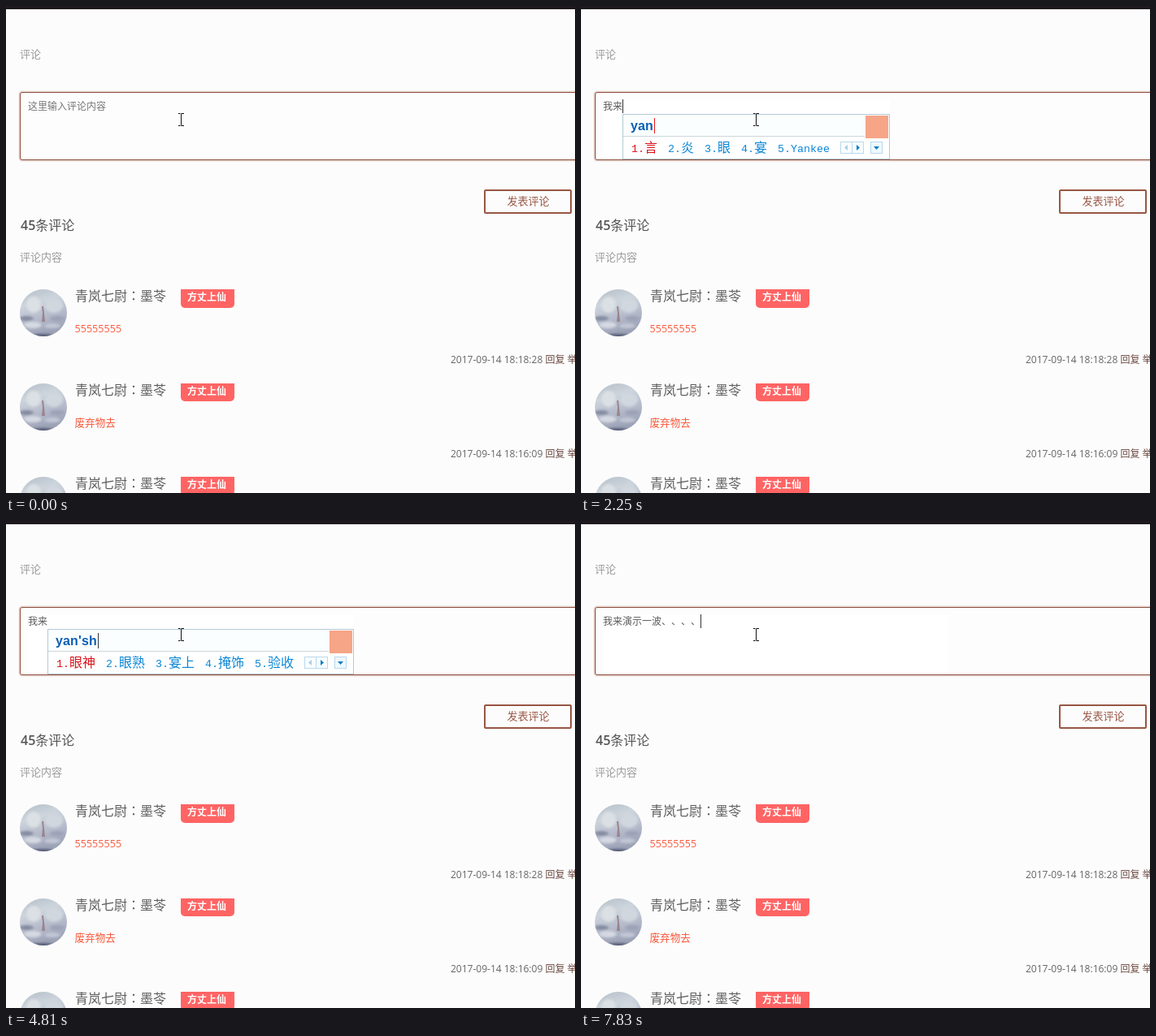
An HTML page for the animation above (8000 ms loop, 700 by 600 pixels).

```html
<!DOCTYPE html>
<html lang="zh-CN">
<head>
<meta charset="utf-8">
<title>评论</title>
<style>
  html, body { margin: 0; width: 100%; height: 100%; overflow: hidden; background: #fcfcfc; }
  svg { display: block; }
  text {
    font-family: "Open Sans", "Noto Sans CJK SC", "Noto Sans CJK JP", sans-serif;
    font-feature-settings: "chws" 0, "halt" 0, "kern" 0;
    font-kerning: none;
    text-spacing-trim: space-all;
    white-space: pre;
  }
  .label { font-size: 13px; fill: #9b9b9b; }
  .typed { font-size: 12px; fill: #5c5c5c; }
  .name { font-size: 16px; fill: #5e5e5e; font-weight: 300; }
  .colon { font-family: "Noto Sans CJK TC", sans-serif; }
  .badge { font-size: 12px; fill: #fff; font-weight: 700; }
  .body { font-size: 12.6px; fill: #fb583a; }
  .date { font-size: 12px; fill: #666; }
  .pinyin { font: bold 16px "Liberation Sans", Arial, sans-serif; letter-spacing: .13px; fill: #0a5fb4; }
  .cand { font-size: 16px; font-weight: 300; }
  .half { font: 13.333px "Liberation Mono", monospace; }
</style>
</head>
<body>
<svg id="stage" width="700" height="600" viewBox="0 0 700 600">
  <defs>
    <linearGradient id="sky" x2="0.3" y2="1">
      <stop offset="0" stop-color="#b3bfc8"/>
      <stop offset=".35" stop-color="#cdd4dc"/>
      <stop offset=".7" stop-color="#b4b9ca"/>
      <stop offset="1" stop-color="#9ca2b6"/>
    </linearGradient>
    <filter id="soft"><feGaussianBlur stdDeviation="1.6"/></filter>
    <clipPath id="round"><circle cx="29" cy="29" r="29"/></clipPath>
    <g id="avatar" clip-path="url(#round)">
      <rect width="58" height="58" fill="url(#sky)"/>
      <g filter="url(#soft)">
        <ellipse cx="17" cy="19" rx="9" ry="10" fill="#dbe0e4"/>
        <ellipse cx="42" cy="20" rx="11" ry="9" fill="#d0d7de"/>
        <ellipse cx="8" cy="36" rx="9" ry="3" fill="#838ba0"/>
        <ellipse cx="46" cy="36" rx="9" ry="3" fill="#9ba2b5"/>
        <ellipse cx="16" cy="44" rx="11" ry="4" fill="#d5d9e2"/>
        <ellipse cx="40" cy="45" rx="10" ry="3" fill="#c3c7d5"/>
        <ellipse cx="28" cy="58" rx="16" ry="3" fill="#555c76"/>
      </g>
      <path d="M27 21h2l1 9 1 10h-4l1-10z" fill="#99848d"/>
    </g>
  </defs>
  <rect width="700" height="600" fill="#fcfcfc"/>
  <rect width="700" height="4" fill="#1f191e"/>
  <text class="label" x="17" y="64">评论</text>
  <rect x="17" y="106" width="720" height="84" rx="3" fill="none" stroke="#a0604c" stroke-opacity=".25" stroke-width="3"/>
  <rect x="17.5" y="106.5" width="720" height="83" rx="2.5" fill="#fdfdfd" stroke="#8f4e3d"/>
  <rect x="589" y="227" width="106" height="28" rx="1" fill="none" stroke="#985644" stroke-width="2"/>
  <text x="616.5" y="245" font-size="13" fill="#985644">发表评论</text>
  <text x="18" y="276" font-size="16" fill="#555"><tspan font-weight="600">45</tspan>条评论</text>
  <text class="label" x="17" y="314">评论内容</text>
  <g id="list"></g>
  <g id="live"></g>
  <path d="M212 132.5h2.5m1 0h3.5M212 147.5h2.5m1 0h3.5M215.5 133v14" fill="none" stroke="#111"/>
</svg>
<script>
const LOOP = 8000;
const $ = id => document.getElementById(id);
const rect = (x, y, w, h, fill, more = '') =>
  `<rect x="${x}" y="${y}" width="${w}" height="${h}" fill="${fill}" ${more}/>`;
const text = (cls, x, y, s, more = '') => `<text class="${cls}" x="${x}" y="${y}" ${more}>${s}</text>`;

// Rows are 115.5 apart; every edge snaps to whole pixels
function comment(row, body, date) {
  const at = dy => Math.round(349.3 + row * 115.5 + dy);
  return `<use href="#avatar" x="17" y="${at(0)}"/>
    ${text('name', 85, at(14), '青岚七尉<tspan class="colon" lang="zh-TW">：</tspan>墨苓')}
    <path d="M215 ${at(0)}h66V${at(22.5) - 5}a5 5 0 0 1-5 5h-56a5 5 0 0 1-5-5z" fill="#ff6464"/>
    ${text('badge', 223, at(14), '方丈上仙')}
    ${text('body', 84.5, at(53), body)}
    ${text('date', 547, at(91), date + ' <tspan fill="#6c4a42">回复 举报</tspan>')}`;
}

$('list').innerHTML =
  comment(0, '55555555', '2017-09-14 18:18:28') +
  comment(1, '废弃物去', '2017-09-14 18:16:09') +
  comment(2, '', '');

const words = {
  'w': '我 为 无 玩 问',
  'wo': '我 握 窝 卧 沃',
  'l': '了 来 里 麟 ⑥',
  'lai': '来 来了 赖 莱 睐',
  'y': '一 有 也 要 以',
  'ya': '呀 压 亚 牙 鸭',
  'yan': '言 炎 眼 宴 Yankee',
  "yan's": '颜色 演算 掩身 燕山 岩石',
  "yan'sh": '眼神 眼熟 宴上 掩饰 验收',
  "yan'shi": '演示 掩饰 岩石 厌食 延时',
  'yi': '一 以 已 亿 意',
  "yi'b": '一遍 一般 一边 一把 一步',
  "yi'bo": '一波 一拨 衣钵 一播 一博'
};

// time, committed text, text caret shown, pinyin being typed
const steps = [
  [0, '', 0, ''],
  [150, '', 0, 'w'],
  [430, '', 0, 'wo'],
  [990, '我', 1, ''],
  [1390, '我', 1, 'l'],
  [1540, '我', 0, 'lai'],
  [1820, '我来', 1, ''],
  [1960, '我来', 1, 'y'],
  [2100, '我来', 1, 'ya'],
  [2250, '我来', 1, 'yan'],
  [2400, '我来', 1, "yan's"],
  [2520, '我来', 0, "yan'sh"],
  [2830, '我来', 1, "yan'sh"],
  [3110, '我来眼神', 1, ''],
  [3480, '我来眼', 1, ''],
  [3630, '我来', 0, ''],
  [4140, '我来', 1, ''],
  [4410, '我来', 1, 'y'],
  [4540, '我来', 1, 'yan'],
  [4680, '我来', 0, "yan's"],
  [4810, '我来', 0, "yan'sh"],
  [4930, '我来', 0, "yan'shi"],
  [5230, '我来演示', 1, ''],
  [5360, '我来演示', 1, 'y'],
  [5490, '我来演示', 1, 'yi'],
  [5900, '我来演示', 0, "yi'b"],
  [6170, '我来演示', 0, "yi'bo"],
  [6450, '我来演示', 1, "yi'bo"],
  [6720, '我来演示一波', 1, ''],
  [6970, '我来演示一波、', 1, ''],
  [7560, '我来演示一波、、', 1, ''],
  [7690, '我来演示一波、、、', 1, ''],
  [7830, '我来演示一波、、、、', 1, '']
];

const isHalf = s => /^[ -~]+$/.test(s);
const wordWidth = w => w.length * (isHalf(w) ? 8 : 16);
const endX = s => 27 + 12 * s.length;
const listEnd = (x, list) => list.reduce((p, w) => p + 16 + wordWidth(w) + 13, x + 11) - 13;
const rightEdge = ([, typed, , py]) => py ? listEnd(endX(typed), words[py].split(' ')) + 74 : 0;

const pen = document.createElement('canvas').getContext('2d');
pen.font = 'bold 16px "Liberation Sans", Arial, sans-serif';
const pinyinWidth = s => Math.round(pen.measureText(s).width + .13 * s.length);

function popup(step) {
  const [time, typed, , py] = step;
  const x = endX(typed), y = typed ? 133 : 135;
  const right = rightEdge(step), end = right - 74;
  let out = rect(x + .5, y + .5, right - x - 1, 55, '#fff', 'stroke="#b3c9d4"');
  out += rect(x + 1, y + 1, right - x - 2, 26, '#fafefe') + rect(x + 1, y + 27, end - x + 42, 1, '#ccd6da');
  out += rect(right - 30, y + 2, 28, 28, '#f6a587');
  out += text('pinyin', x + 10, y + 20, py);
  out += rect(x + 11 + pinyinWidth(py), y + 5, 1, 19, time < 3110 ? '#f01818' : '#333');
  let p = x + 11;
  words[py].split(' ').forEach((w, i) => {
    const fill = `fill="${i ? '#0a86d6' : '#d8141c'}"`;
    out += text('half', p, y + 47, i + 1 + '.', fill);
    out += text(isHalf(w) ? 'half' : 'cand', p + 16, y + 47, w, fill);
    p += 29 + wordWidth(w);
  });
  const a = end + 13, b = y + 34, line = 'stroke="#b9d9ec"';
  out += rect(a + .5, b + .5, 28, 14, '#f8fdff', line) + rect(a + 14, b, 1, 15, '#b9d9ec');
  out += rect(a + 37.5, b + .5, 14, 14, '#eef9ff', line);
  out += `<path d="M${a + 9} ${b + 4}v7l-4-3.5z" fill="#a9cfe6"/>`;
  out += `<path d="M${a + 20} ${b + 4}v7l4-3.5zM${a + 41} ${b + 6}h7l-3.5 4z" fill="#0a7cc8"/>`;
  return out;
}

function draw(n) {
  const step = steps[n], [, typed, caret, py] = step;
  const seen = Math.max(...steps.slice(0, n + 1).map(rightEdge));
  let out = seen ? rect(27, 115, seen - 27, 73, '#fff') : '';
  out += n ? text('typed', 27, 128, typed) : text('typed', 27, 128, '这里输入评论内容', 'style="fill:#777"');
  if (caret) out += rect(endX(typed), 115, 1, 17, '#333');
  if (py) out += popup(step);
  $('live').innerHTML = out;
}

let shown = -1;
const start = performance.now();
function tick() {
  const t = (performance.now() - start) % LOOP;
  const n = steps.findLastIndex(s => s[0] <= t);
  if (n !== shown) draw(shown = n);
  requestAnimationFrame(tick);
}
tick();
</script>
</body>
</html>
```
